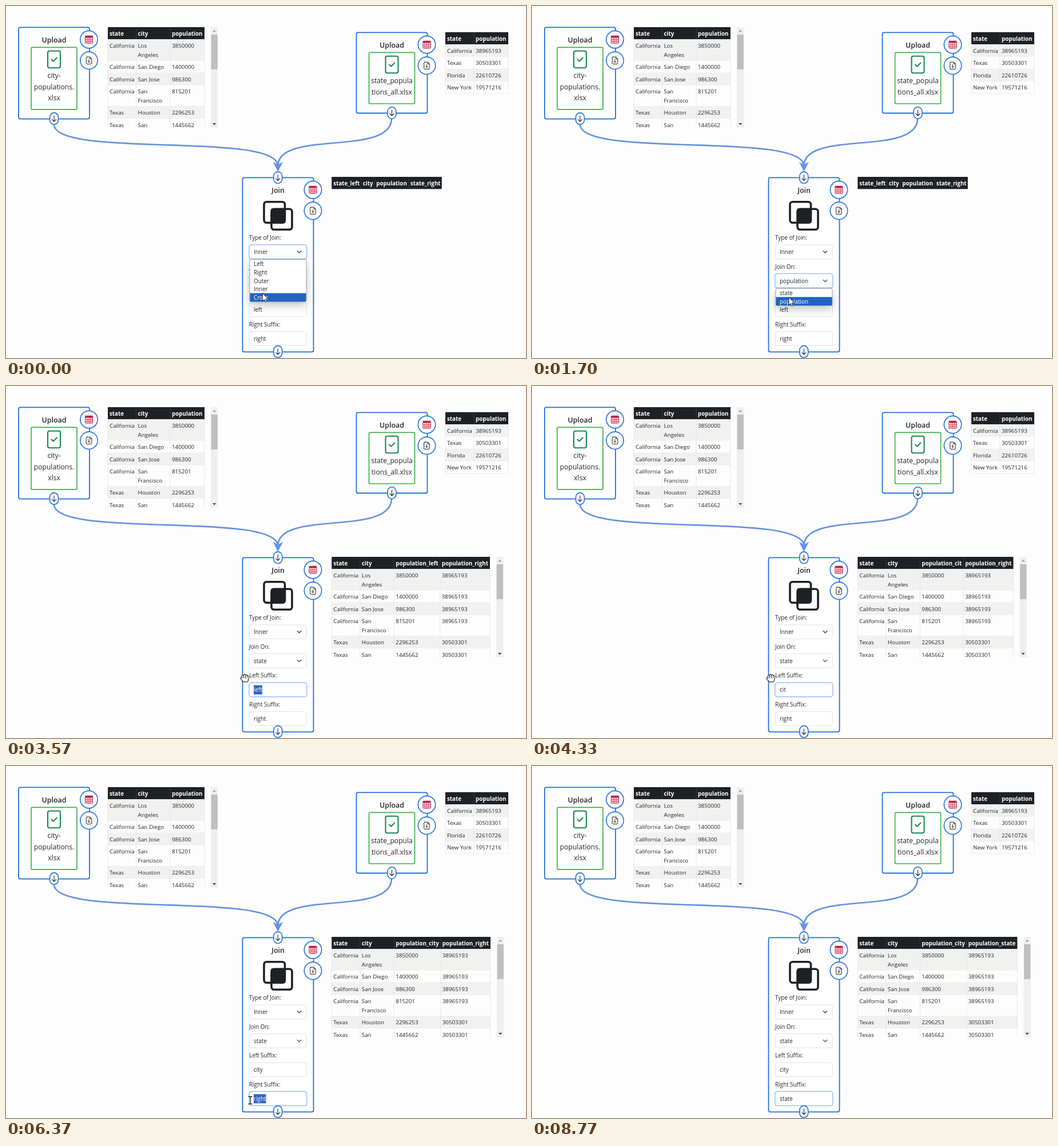
Recreate the animation shown at these times as an HTML page. Size 909 by 616 pixels, loop 8810 ms.

```html
<!DOCTYPE html>
<html lang="en">
<head>
<meta charset="utf-8">
<title>Join node</title>
<style>
html, body { margin: 0; width: 100%; height: 100%; overflow: hidden; background: #fdfdfd; }
svg { display: block; }
text { font: 9.8px "Open Sans", "Noto Sans", sans-serif; fill: #212529; white-space: pre; }
.b { font-weight: 700; fill: #fff; }
.f { font-size: 9.9px; }
.h { font-size: 12.4px; font-weight: 600; text-anchor: middle; }
.n { font-size: 12.1px; text-anchor: middle; }
.w { fill: #fff; }
</style>
</head>
<body>
<svg width="909" height="616" viewBox="0 0 909 616">
  <defs>
    <filter id="shade" x="-40%" y="-40%" width="180%" height="200%">
      <feDropShadow dx="0" dy="6" stdDeviation="8" flood-opacity=".22"/>
    </filter>
  </defs>
  <g id="base"></g>
  <g id="live"></g>
</svg>
<script>
const LOOP = 8810, BLUE = '#1f6fde', DARK = '#1d2125';
const CITIES = [
  ['California', 'Los Angeles', '3850000', '38965193'],
  ['California', 'San Diego', '1400000', '38965193'],
  ['California', 'San Jose', '986300', '38965193'],
  ['California', 'San Francisco', '815201', '38965193'],
  ['Texas', 'Houston', '2296253', '30503301'],
  ['Texas', 'San Antonio', '1445662', '30503301']
];
const STATES = [['California', '38965193'], ['Texas', '30503301'], ['Florida', '22610726'], ['New York', '19571216']];
const WRAP = /^(Los|San) (Angeles|Francisco|Antonio)$/;

const pen = document.createElement('canvas').getContext('2d');
const width = (s, size = 9.8, weight = 400) => {
  pen.font = `${weight} ${size}px "Open Sans", "Noto Sans", sans-serif`;
  return pen.measureText(s).width;
};

const text = (x, y, s, cls = '') => `<text x="${x}" y="${y}" class="${cls}">${s}</text>`;
const rect = (x, y, w, h, fill, more = '') =>
  `<rect x="${x}" y="${y}" width="${w}" height="${h}" fill="${fill}" ${more}/>`;
const path = (d, stroke, w, fill = 'none', more = '') =>
  `<path d="${d}" stroke="${stroke}" stroke-width="${w}" fill="${fill}" stroke-linecap="round" stroke-linejoin="round" ${more}/>`;
const at = (x, y, s) => `<g transform="translate(${x} ${y})">${s}</g>`;
const outline = (color, w, r) => `stroke="${color}" stroke-width="${w}" rx="${r}"`;

// cols holds the column edges, the last one being the table width
function table(x, y, cols, head, rows) {
  const w = cols[cols.length - 1], inner = cols.slice(1, -1);
  let s = rect(0, 0, w, 21.3, DARK), top = 21.3;
  head.forEach((h, i) => s += text(cols[i] + 3, 14.8, h, 'b'));
  for (const c of inner) s += path(`M${c} 1V20.5`, '#3d4246', .8);
  rows.forEach((row, i) => {
    const h = row.some(c => WRAP.test(c)) ? 37.2 : 21.5;
    s += rect(0, top, w, h, i % 2 ? '#fdfdfd' : '#f1f1f0');
    s += path(`M0 ${top + h}H${w}` + [0, ...inner, w].map(c => `M${c} ${top}v${h}`).join(''), '#e3e4df', .7);
    row.slice(0, head.length).forEach((c, j) =>
      (WRAP.test(c) ? c.split(' ') : [c]).forEach((line, k) =>
        s += text(cols[j] + 3, top + 14.6 + k * 15.8, line)));
    top += h;
  });
  return at(x, y, s);
}

function scrolled(x, y, cols, head, rows) {
  const w = cols[cols.length - 1];
  return `<svg x="0" y="0" width="909" height="${y + 176}">${table(x, y, cols, head, rows)}</svg>` +
    at(x + w + 11, y,
      rect(0, 0, 12.5, 176, '#efeff1') + rect(.6, 13, 11.3, 61, '#bfbfc1') +
      '<path d="M3 8.3h6.4L6.2 4.8z" fill="#a0a0a0"/><path d="M3 168h6.4l-3.2 3.5z" fill="#484848"/>');
}

const disc = (x, y, icon) =>
  at(x, y, `<circle r="15.2" fill="#fff" stroke="${BLUE}" stroke-width="1.6"/>` + icon);

const gridIcon = rect(-6.5, -6.2, 13, 12.6, '#fff', outline('#c01f45', 1.1, 1.3)) +
  rect(-6.5, -6.2, 13, 3.2, '#c01f45') +
  path('M-6.5 .2h13M-6.5 3.4h13M-3.2 -3V6.4M0 -3V6.4M3.2 -3V6.4', '#c01f45', .9);
const fileIcon = path('M-3.6 -6.2H1.6L4.8 -3V5a1.2 1.2 0 0 1 -1.2 1.2H-3.6A1.2 1.2 0 0 1 -4.8 5V-5A1.2 1.2 0 0 1 -3.6 -6.2Z', DARK, 1) +
  path('M1.6 -6V-3H4.6M0 -1.6V3.4M-2 1.5L0 3.5 2 1.5', DARK, 1);

const port = (x, y) => at(x, y,
  rect(-7.4, -10.2, 14.8, 20.4, '#fff', outline(BLUE, 1.6, 7.4)) +
  path('M0 -4.7V4.9M-3.6 1.5L0 5 3.6 1.5', DARK, 1.1));

const node = (x, y, h, title) =>
  rect(x, y, 124, h, '#fff', outline(BLUE, 1.8, 3)) +
  text(x + 62, y + 26.5, title, 'h') +
  disc(x + 123, y + 21.3, gridIcon) + disc(x + 123, y + 58, fileIcon);

function upload(x, y, h, lines) {
  return node(x, y, h, 'Upload') +
    rect(x + 22, y + 35, 80, h - 51.5, '#fff', outline('#3fae49', 1.7, 2)) +
    rect(x + 51, y + 41.5, 22, 29.5, '#fff', outline('#198754', 2.1, 3)) +
    path(`M${x + 57.5} ${y + 56.2}l3.2 3.3 6.2 -6.3`, '#198754', 2) +
    lines.map((s, i) => text(x + 62, y + 89 + i * 19.5, s, 'n')).join('') +
    port(x + 62, y + h - .5);
}

const EDGE = '#6593e2';
document.getElementById('base').innerHTML =
  path('M84 207C84 267 475.3 219 475.3 280M674 197C674 264 475.3 216 475.3 280', EDGE, 2.7) +
  `<path d="M467 273L475.3 290 484 273 475.3 277.5Z" fill="${EDGE}"/>` +
  upload(22, 37.3, 160.3, ['city-', 'populations.', 'xlsx']) +
  upload(612.5, 46.3, 141.2, ['state_popula', 'tions_all.xlsx']) +
  scrolled(178, 37, [0, 49.5, 109, 169], ['state', 'city', 'population'], CITIES) +
  table(768, 45.8, [0, 50, 110], ['state', 'population'], STATES) +
  node(413.5, 300.3, 305, 'Join') +
  rect(464, 355.2, 36, 36, 'none', outline(DARK, 3.6, 4.5)) +
  rect(451, 342.8, 36.5, 36.5, 'none', outline(DARK, 3.6, 4.5)) +
  rect(463, 354.2, 25.5, 26, DARK, 'rx="3"') +
  ['Type of Join:', 'Join On:', 'Left Suffix:', 'Right Suffix:']
    .map((s, i) => text(425, 409 + i * 50.6, s, 'f')).join('') +
  port(475.3, 300.3);

// time, x, y
const MOVES = [
  [0, 448.5, 503], [350, 448.5, 503], [700, 448.5, 491], [950, 448.5, 491], [1300, 448.5, 482],
  [1450, 448.5, 482], [1680, 449, 510], [1850, 449, 510], [2050, 449, 502], [2350, 449, 502],
  [2850, 450, 531], [3050, 450, 531], [3500, 417.5, 511.5], [4750, 417.5, 511.5], [5330, 454.5, 567],
  [5650, 459, 582], [5850, 459, 582], [6300, 427, 585], [7250, 427, 585], [7630, 455, 345], [7980, 462, -20]
];
function pointer(t) {
  const i = MOVES.findIndex(m => m[0] > t);
  if (i < 0) return [462, -20];
  const [t0, x0, y0] = MOVES[i - 1], [t1, x1, y1] = MOVES[i];
  const p = (t - t0) / (t1 - t0), e = p * p * (3 - 2 * p);
  return [x0 + (x1 - x0) * e, y0 + (y1 - y0) * e];
}

const typed = (t, start, step, before, word) =>
  t < start ? before : word.slice(0, 1 + Math.floor((t - start) / step));

function field(i, value, focus, select, chosenFrom) {
  const y = 418 + i * 50.6;
  let s = '';
  if (focus) s += rect(423.8, y - 1.2, 103, 27, '#c6dbfb', 'rx="5"');
  s += rect(425, y, 100.6, 24.5, '#fff', outline(focus ? '#8fb9f5' : '#dee2e6', 1, 4));
  if (select) s += path(`M509.3 ${y + 10.8}l3.2 3.2 3.2 -3.2`, '#343a40', 1.3);
  if (chosenFrom === undefined) return s + text(433, y + 16.2, value, 'f');
  let k = 0;
  while (k < value.length && 433 + width(value.slice(0, k + 1), 9.9) - 2 < chosenFrom) k++;
  const x = 433 + width(value.slice(0, k), 9.9), w = width(value.slice(k), 9.9);
  return s + rect(x, y + 4.5, w, 16, '#2f63c6') +
    text(433, y + 16.2, `${value.slice(0, k)}<tspan class="w">${value.slice(k)}</tspan>`, 'f');
}

function popup(y, items, cy) {
  const step = 14.7, hot = Math.max(0, Math.min(items.length - 1, Math.floor((cy - y - .3) / step)));
  return rect(426, y, 99, items.length * step + .8, '#fff', 'rx="3" stroke="#8d9299" stroke-width=".9" filter="url(#shade)"') +
    rect(426.4, y + .4 + hot * step, 98.2, step, '#2064c0', 'rx="1"') +
    items.map((s, i) => text(433, y + 11.8 + i * step, s, i === hot ? 'f w' : 'f')).join('');
}

const ARROW = path('M0 0V13.2L3 10.5 5 15 7.2 14 5.2 9.7H9.3Z', '#222', .9, '#fff');
const HAND_LINES = 'M-3.5 1V-4M-.5 0V-5.5M2.5 0V-5M5.2 1V-3.3M-6 0L-3 4M-3 1H5L4 5H-1Z';
const HAND = path(HAND_LINES, '#111', 4) + path(HAND_LINES, '#fff', 2, '#fff');
const BEAM_LINES = 'M-3 -6.5H-1Q0 -6.5 0 -5.5Q0 -6.5 1 -6.5H3M0 -5.5V5.5M-3 6.5H-1Q0 6.5 0 5.5Q0 6.5 1 6.5H3';
const BEAM = path(BEAM_LINES, '#fff', 2.6) + path(BEAM_LINES, '#111', 1.3);

function cursor(x, y, open) {
  const over = (a, b) => x > 425 && x < 526 && y > a && y < b;
  if (open || y < 400 || over(418, 443) || over(468, 494)) return at(x, y, ARROW);
  return at(x, y, over(519, 544) || over(570, 595) ? BEAM : HAND);
}

function draw(t) {
  const [x, y] = pointer(t);
  const typeOpen = t < 850, onOpen = t >= 1400 && t < 2150;
  const focus = t < 1400 ? 0 : t < 2950 ? 1 : t < 5750 ? 2 : 3;
  const left = typed(t, 3950, 170, 'left', 'city'), right = typed(t, 6600, 140, 'right', 'state');
  const leftSel = t > 3050 && t < 3950 ? x : undefined;
  const rightSel = t > 5850 && t < 6600 ? x : undefined;

  let s = field(0, 'Inner', focus === 0, true) +
    field(1, t < 2150 ? 'population' : 'state', focus === 1, true) +
    field(2, left, focus === 2, false, leftSel) +
    field(3, right, focus === 3, false, rightSel) +
    port(475.3, 604.8);

  if (t < 2250) {
    s += table(569.3, 299, [0, 51.5, 75, 134.5, 192.5], ['state_left', 'city', 'population', 'state_right'], []);
  } else {
    const heads = ['population_' + left, 'population_' + right];
    const [a, b] = heads.map(h => width(h, 9.8, 700) + 6);
    s += scrolled(569.3, 299, [0, 49.5, 109, 109 + a, 109 + a + b], ['state', 'city', ...heads], CITIES);
  }
  if (typeOpen) s += popup(443.3, ['Left', 'Right', 'Outer', 'Inner', 'Cross'], y);
  if (onOpen) s += popup(494.2, ['state', 'population'], t < 1550 ? 515 : y);
  return s + cursor(x, y, typeOpen || onOpen);
}

const live = document.getElementById('live');
let last = '';
function frame() {
  const s = draw(performance.now() % LOOP);
  if (s !== last) live.innerHTML = last = s;
  requestAnimationFrame(frame);
}
frame();
</script>
</body>
</html>
```
